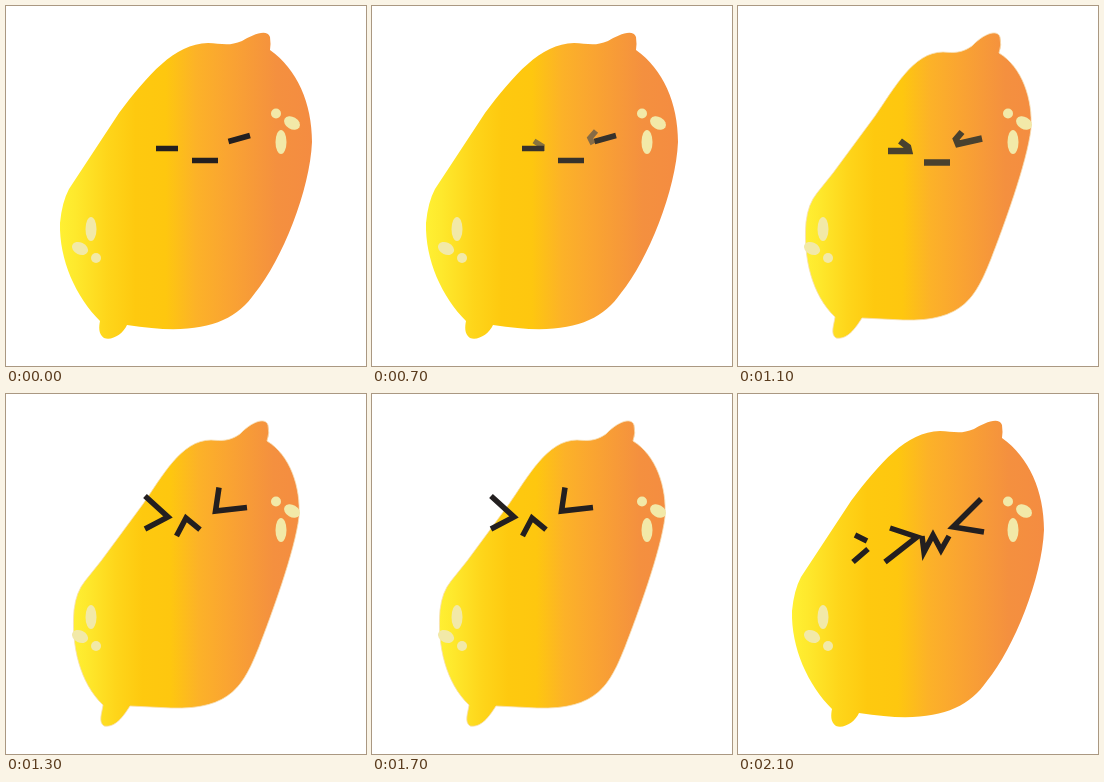
These frames come from a looping animation (360 px wide and 360 px high, 2.6 s). An HTML page with a canvas:

```html
<!DOCTYPE html>
<html>
<head>
<meta charset="utf-8">
<title>Lemon</title>
<style>
html, body { margin: 0; width: 100%; height: 100%; overflow: hidden; background: #fff; }
canvas { display: block; width: 100vmin; height: 100vmin; }
</style>
</head>
<body>
<canvas id="stage" width="360" height="360"></canvas>
<script>
const ctx = document.getElementById('stage').getContext('2d');
const LOOP = 2600, INK = '#231f20';

const bodies = {
  round: { left: 54, right: 306, path: new Path2D(
    'M63 183L113 107C142 69 168 38 202 37C214 37 222 41 236 35C246 29 261 22 264 31Q265 38 264 44' +
    'C291 63 306 97 306 136C304 184 276 254 249 287C227 319 190 330 121 319' +
    'C117 328 106 335 98 332C92 328 93 320 94 315C70 291 53 254 54 217Q56 196 63 183Z') },
  pressed: { left: 60, right: 302, edge: 1, path: new Path2D(
    'M69 187L133 103C158 69 179 42 209 41C218 41 225 42 236 37C246 29 259 22 262 31Q264 39 262 45' +
    'C286 62 301 97 300 135C296 166 273 229 255 268C235 309 211 326 122 317' +
    'C117 326 109 334 98 332C92 328 95 320 95 313C73 288 58 254 60 217Q61 199 69 187Z') },
  squeezed: { left: 66, right: 300, edge: 1, path: new Path2D(
    'M79 187L95 167L137 110C156 83 175 46 205 46C216 47 224 47 234 40C244 29 259 22 262 31Q264 39 261 47' +
    'C284 61 295 93 293 123C289 157 265 222 253 253C238 290 226 316 165 314L124 312' +
    'C117 323 109 334 98 332C92 328 96 319 97 311C74 289 65 252 68 216Q70 198 79 187Z') }
};
const slivers = new Path2D(
  'M67 178Q103 114 151 67Q110 117 67 178ZM302 168Q293 217 265 265Q287 217 302 168Z');

const faces = {
  asleep: new Path2D('M150 142.5H172M186 154.5H212M222.5 135.5L244 129.5'),
  lids: new Path2D('M162 135L170 140V145M224 125L218 132L221 138'),
  frown: new Path2D('M150 145H171L170 141L162 135M186 156.5H212M224 126L218 133L220 138L244 132.5'),
  wince: new Path2D('M79 102L102 123L79 135M110.5 142L120 124L134 135.5M153 93.5L149.5 117L181 113.5'),
  grimace: new Path2D('M152 134L179 143L147 168M184 142L186 158L195 141L203 156L211 142' +
    'M243 105L215 133L246 138M117 141L129 147M115 168L130 155')
};

// [x, y, rx, ry, degrees]
const spots = [
  [85, 223, 5.5, 12, 0], [74, 242.5, 8.5, 6, 25], [90, 252, 5, 5, 0],
  [270, 107.5, 5, 5, 0], [286, 117, 8.5, 6, 30], [275, 136, 5.5, 12, 0]
];

function peel({ left, right }) {
  const g = ctx.createLinearGradient(left, 0, right, 0);
  [[0, '#fff033'], [.06, '#fee92d'], [.19, '#fed51a'], [.3, '#fec90f'], [.42, '#fec70f'],
   [.54, '#fcb228'], [.66, '#faa531'], [.86, '#f4903f'], [1, '#f48c41']]
    .forEach(([at, color]) => g.addColorStop(at, color));
  return g;
}

function drawBody(body) {
  ctx.fillStyle = peel(body);
  ctx.fill(body.path);
  if (body.edge) {
    ctx.lineWidth = .8;
    ctx.strokeStyle = '#f6dfb4';
    ctx.stroke(body.path);
  }
}

function drawSpots() {
  ctx.fillStyle = '#f2e9a8';
  for (const [x, y, rx, ry, deg] of spots) {
    ctx.beginPath();
    ctx.ellipse(x, y, rx, ry, deg * Math.PI / 180, 0, 7);
    ctx.fill();
  }
}

function drawFace(name, { color = INK, width = 5.5, dx = 0, dy = 0, alpha = 1 } = {}) {
  ctx.save();
  ctx.translate(dx, dy);
  ctx.globalAlpha = alpha;
  ctx.strokeStyle = color;
  ctx.lineWidth = width;
  ctx.stroke(faces[name]);
  ctx.restore();
}

function draw(now) {
  const t = now % LOOP, step = Math.floor(t / 100);
  const shape = t < 900 || t >= 2100 ? 'round' : t < 1100 ? 'pressed' : 'squeezed';
  ctx.clearRect(0, 0, 360, 360);
  drawBody(bodies[shape]);
  if (shape === 'pressed') {
    ctx.fillStyle = peel(bodies.round);
    ctx.fill(slivers);
  }
  drawSpots();

  if (t < 500) drawFace('asleep');
  else if (t < 900) {
    drawFace('lids', { color: '#60594c', alpha: Math.min(step - 4, 3) / 4 });
    drawFace('asleep', { color: '#37322c' });
  } else if (t < 1100) drawFace('frown', { color: '#60574a', width: 6.5 });
  else if (t < 1300) drawFace('frown', { color: '#49412f', width: 6.5 });
  else if (t < 1900) drawFace('wince', { dx: [60, 25, 0, -5, 40, 76][step - 13] });
  else if (t < 2100) drawFace('wince', { dx: 67.5, dy: -10 });
  else drawFace('grimace');
}

const start = performance.now();
function tick() {
  draw(performance.now() - start);
  requestAnimationFrame(tick);
}
tick();
</script>
</body>
</html>
```
